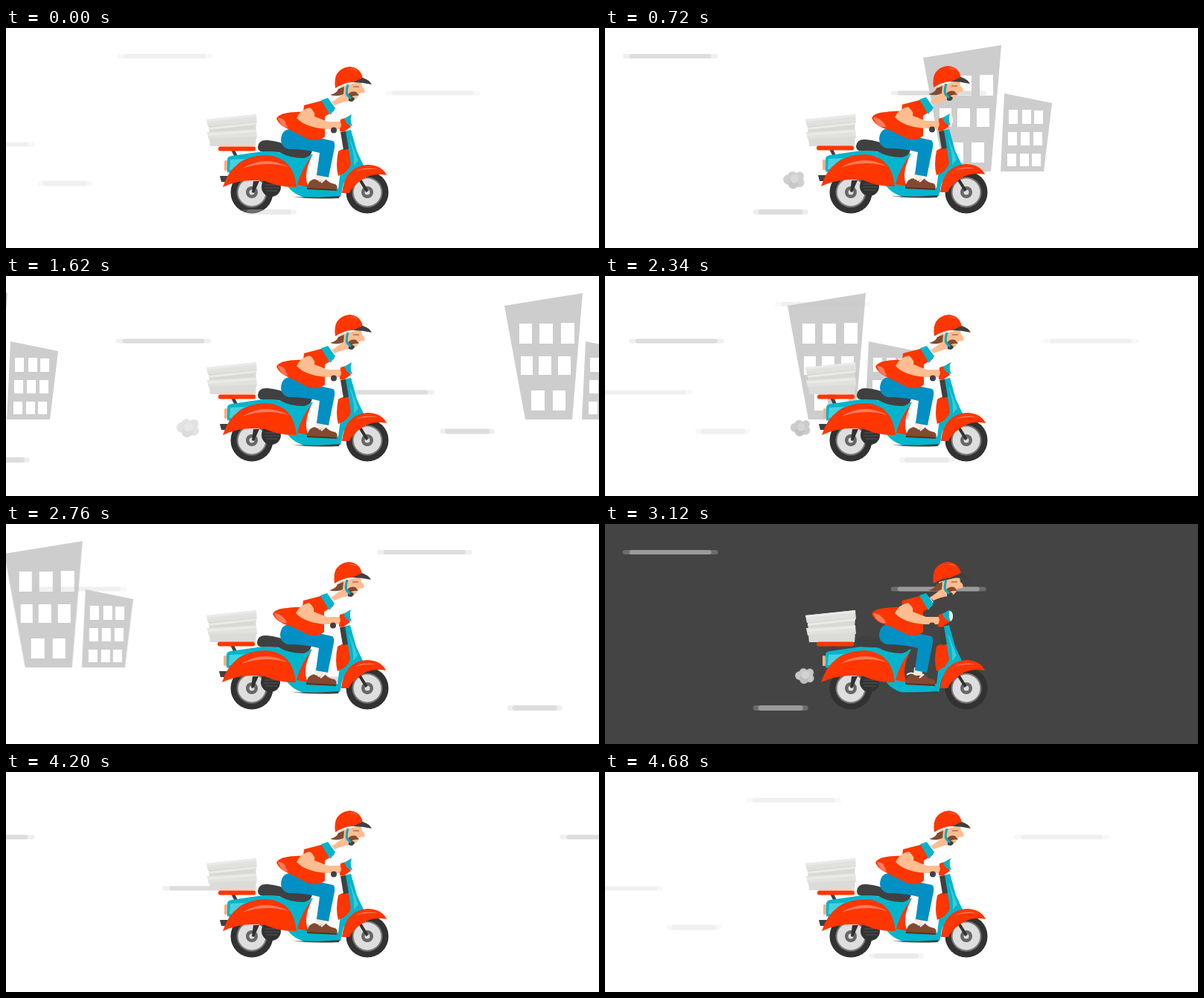
An HTML page without scripts that plays this animation: 796x296 px, repeating every 4710 ms.

```html
<!DOCTYPE html>
<html lang="en">
<head>
<meta charset="utf-8">
<title>Scooter delivery</title>
<style>
  html, body { margin: 0; width: 100%; height: 100%; overflow: hidden; background: #fff; }
  svg { display: block; width: 796px; height: 296px; }
  .town, .wind { animation: 4.71s -5ms infinite steps(78); }
  .town { animation-name: town; }
  .wind { animation-name: wind; }
  .night { opacity: 0; animation: night 4.71s -5ms infinite step-end; }
  .second { animation: second 4.71s -5ms infinite step-end; }
  .third { animation: third 4.71s -5ms infinite step-end; }
  .bob { animation: bob 588.75ms infinite step-end; }
  .tail { animation: tail 588.75ms infinite step-end; }
  .puff { opacity: 0; animation: puff 4.71s calc(var(--at) * 1ms - 4710ms) infinite linear; }
  @keyframes town { 99.363%, to { transform: translateX(-2756px); } }
  @keyframes wind { 99.363%, to { transform: translateX(-6164px); } }
  @keyframes night { 62.42% { opacity: 1; } 87.26% { opacity: 0; } }
  @keyframes second { 0% { opacity: 0; } 48.4% { opacity: 1; } 98% { opacity: 0; } }
  @keyframes third { 0% { opacity: 0; } 98% { opacity: 1; } }
  @keyframes bob { 20% { transform: translate(-1px, -1px); } 70% { transform: none; } }
  @keyframes tail { 20% { transform: translate(-4px, 0); } 70% { transform: none; } }
  @keyframes puff {
    0% { opacity: 1; transform: translate(285px, 204px) scale(.2); }
    3% { opacity: 1; transform: translate(269px, 204px) scale(.85); }
    7.4% { opacity: .85; transform: translate(249px, 204px) scale(1); }
    10.6% { opacity: 0; transform: translate(235px, 204px) scale(1.05); }
    to { opacity: 0; transform: translate(235px, 204px); }
  }
  .red { fill: #ff3600; }
  .teal { fill: #00b5cd; }
  .blue { fill: #0090c4; }
  .skin { fill: #ffbd90; }
  .brown { fill: #834a30; }
  .soot { fill: #404040; }
  .tyre { fill: #323232; }
  .shine { fill: #ff7c5b; }
</style>
</head>
<body>
<svg viewBox="0 0 796 296">
  <defs>
    <g id="long" fill="#cbcbcb">
      <rect y="-3" width="128" height="6" rx="3" opacity=".3"/>
      <rect x="9" y="-3" width="110" height="6" rx="3" opacity=".5"/>
    </g>
    <g id="short" fill="#cbcbcb">
      <rect y="-3.5" width="74" height="7" rx="3.5" opacity=".3"/>
      <rect x="7" y="-3.5" width="60" height="7" rx="3.5" opacity=".5"/>
    </g>
    <g id="gust">
      <use href="#long" x="-360" y="38"/>
      <use href="#long" y="87.5"/>
      <use href="#short" x="-467" y="209"/>
    </g>
    <g id="opening" opacity=".42">
      <use href="#gust" x="588"/>
      <use href="#long" x="-10" y="156.5"/>
    </g>
    <g id="gusts">
      <use href="#opening"/>
      <use href="#gust" x="1411"/>
      <use href="#gust" x="2360"/>
      <use href="#long" x="3193" y="87.5"/>
      <use href="#long" x="2660" y="156.5"/>
      <use href="#short" x="2795" y="209"/>
    </g>
    <g id="low">
      <use href="#short" x="395" y="247.5" opacity=".6"/>
      <use href="#short" x="1226" y="247.5"/>
      <use href="#short" x="2171" y="247.5"/>
    </g>
    <path id="block" fill="#cdcdcd" fill-rule="evenodd" d="M0 40L105 23 91 193H28z
      M20 64h17v27h-17zM47 64h18v27h-18zM76 63h18v28h-18z
      M22 108h16v25h-16zM46 108h17v25h-17zM72 108h17v25h-17z
      M36 154h18v27h-18zM65 154h17v27h-17z
      M109 88L173 101 162 193H104z
      M115 110h12v19h-12zM133 110h12v19h-12zM149 111h12v18h-12z
      M114 140h12v18h-12zM131 140h12v18h-12zM148 140h12v18h-12z
      M113 169h12v17h-12zM130 169h12v17h-12zM146 169h12v17h-12z"/>
    <g id="wheel">
      <circle r="28.5" class="tyre"/>
      <circle r="20.5" fill="#777"/>
      <circle r="18.5" fill="#dedede"/>
      <circle r="8" fill="#666"/>
      <circle r="3.5" fill="#ddd"/>
    </g>
    <g id="cloud" fill="#cacaca">
      <circle cx="-8" r="7"/><circle cx="-2" cy="-5" r="6.5"/><circle cx="8" cy="-5" r="6"/>
      <circle cx="8" cy="4" r="6.5"/><circle cx="-1" cy="6" r="7" fill="#c0c0c0"/>
      <circle cx="1" cy="-1" r="6" fill="#d4d4d4"/>
    </g>
  </defs>

  <rect class="night" width="796" height="296" fill="#444"/>

  <g class="town"><use href="#block" x="851"/><use href="#block" x="1623"/></g>

  <g class="wind">
    <use href="#gusts" x="-79"/>
    <g class="second"><use href="#gusts" x="3082"/></g>
    <g class="third"><use href="#opening" x="6125"/></g>
  </g>

  <use href="#cloud" class="puff" style="--at:420"/>
  <use href="#cloud" class="puff" style="--at:1220"/>
  <use href="#cloud" class="puff" style="--at:2130"/>
  <use href="#cloud" class="puff" style="--at:2970"/>
  <use href="#cloud" class="puff" style="--at:3550"/>

  <!-- pizza boxes -->
  <g fill="#e1e1de">
    <path d="M269 123L336 116 337 128 271 133z"/>
    <path d="M272 132L336 126 335 138 273 142z" fill="#d8d8d5"/>
    <path d="M270 140L336 136 337 148 272 150z"/>
    <path d="M273 149L336 146 335 159H274z" fill="#dbdbd8"/>
    <path d="M269 123L336 116V119L270 126zM272 134L336 127V130L272 137zM271 142L336 137V140L271 145z" fill="#eaeae7"/>
  </g>

  <use href="#wheel" x="330" y="221"/>
  <use href="#wheel" x="485" y="221"/>

  <g class="bob">
    <!-- scooter -->
    <path class="soot" d="M287 199L301 199V207H289zM302 164L307 164 313 176H308z"/>
    <rect class="red" x="285" y="159.5" width="50" height="6" rx="2.5"/>
    <path class="teal" d="M297 177Q297 173 303 172L345 166 412 170Q400 186 399 203 402 214 420 216H446L455 146 454 139 463 137 471 166 480 185 465 196Q451 206 451 220L449 227 400 228Q385 223 378 213L297 194z"/>
    <path d="M301 177L322 176Q310 181 306 191H300z" fill="#43d3e0"/>
    <path class="soot" d="M380 226Q400 229 448 226L447 229Q405 231 380 226z"/>
    <path class="red" d="M411 172Q397 188 391 211L406 214Q398 197 411 172z"/>
    <rect x="293" y="178" width="4" height="14" rx="1.5" fill="#ffae87"/>
    <path class="tyre" d="M332 206L340 206 333 222 330 221z"/>
    <circle class="tyre" cx="356" cy="214" r="13"/>
    <path d="M348 211H366M347 215H367M349 219H365" stroke="#555"/>
    <path class="red" d="M291 214Q304 172 349 171 386 173 390 214 369 215 348 206 316 202 291 214z"/>
    <path class="shine" d="M317 189Q347 170 379 187 348 178 317 189z"/>
    <path class="red" d="M446 166Q454 160 460 164L463 183Q460 194 446 199 442 185 446 166z"/>
    <path d="M463 152L473 178 467 185Q468 168 461 150z" fill="#36cbd9"/>
    <path class="soot" d="M449 140L456 139 460 163 453 164z"/>
    <path d="M475 204L485 220" stroke="#323232" stroke-width="4"/>
    <path class="red" d="M451 222Q455 186 485 184 504 184 511 198 489 194 475 206 465 213 461 222z"/>
    <path class="shine" d="M469 193Q483 186 499 190 483 189 469 193z"/>
    <path class="soot" d="M338 160Q339 150 351 151 367 152 382 160 396 164 411 163 411 173 399 175 381 175 367 167L342 166Q338 165 338 160z"/>

    <!-- rider -->
    <path d="M416 194L427 196 427 205 415 205z" fill="#f6e9dc"/>
    <path class="blue" d="M369 150Q370 137 381 136L425 149 439 152Q442 154 441 161L433 201 417 198 421 168Q402 163 379 163 369 160 369 150z"/>
    <path class="brown" d="M404 214Q407 203 416 203L421 207 429 203Q434 209 442 210 447 214 443 218L405 217z"/>
    <path d="M406 204Q412 199 418 204M423 208L429 203" stroke="#fff" stroke-width="2" fill="none"/>
    <path d="M404 216L444 218" stroke="#5a3022" stroke-width="2"/>
    <g class="tail">
      <path class="red" d="M363 122Q367 113 390 114L400 140Q370 138 363 122z"/>
      <path class="shine" d="M365 121Q375 121 383 134 370 136 365 121z"/>
    </g>
    <path class="red" d="M370 116Q384 112 399 113L400 104 427 97 441 111 428 119 428 146Q420 154 404 149L379 136z"/>
    <path class="skin" d="M390 121Q396 109 408 107 416 114 414 119L432 126 449 126Q452 131 449 136L430 136Q402 134 390 121z"/>
    <path d="M431 96L438 101 442 106 436 110z" fill="#fff"/>
    <path class="teal" d="M423 97L432 94 442 108 435 117z"/>
    <path class="skin" d="M437 100L451 90 449 79 477 72 478 79Q483 82 481 87L474 88Q472 97 462 98 452 99 442 104z"/>
    <path class="brown" d="M435 90Q444 88 446 82L454 79 453 89Q445 93 435 90z"/>
    <path d="M466 79H474" stroke="#834a30"/>
    <path class="brown" d="M458 92Q461 84 470 86L474 91Q466 90 463 94z"/>
    <path class="soot" d="M460 94Q465 91 468 95 466 101 460 98z"/>
    <path d="M459 76Q456 86 458 90L463 95" stroke="#00a9c4" stroke-width="3" fill="none"/>
    <path class="red" d="M442 81Q438 55 461 52 476 53 479 68L465 73Q455 73 442 81z"/>
    <path class="shine" d="M460 55Q468 54 472 58 466 55 460 55z"/>
    <path class="soot" d="M465 73L479 67Q488 70 491 76 478 73 465 73z"/>

    <!-- handlebar -->
    <path class="red" d="M448 139L449 123 456 121 463 133 453 140z"/>
    <path class="skin" d="M432 126H448Q452 130 448 135L434 136z"/>
    <circle class="soot" cx="440" cy="137.5" r="4"/>
    <ellipse cx="464" cy="125" rx="4" ry="7" fill="#fff"/>
    <path class="teal" d="M454 122L464 116Q461 124 465 132 457 131 454 122z"/>
  </g>

  <g class="wind">
    <use href="#low" x="-79"/>
    <g class="second"><use href="#low" x="3082"/></g>
    <g class="third"><use href="#short" x="6518" y="247.5" opacity=".6"/></g>
  </g>
</svg>
</body>
</html>
```
